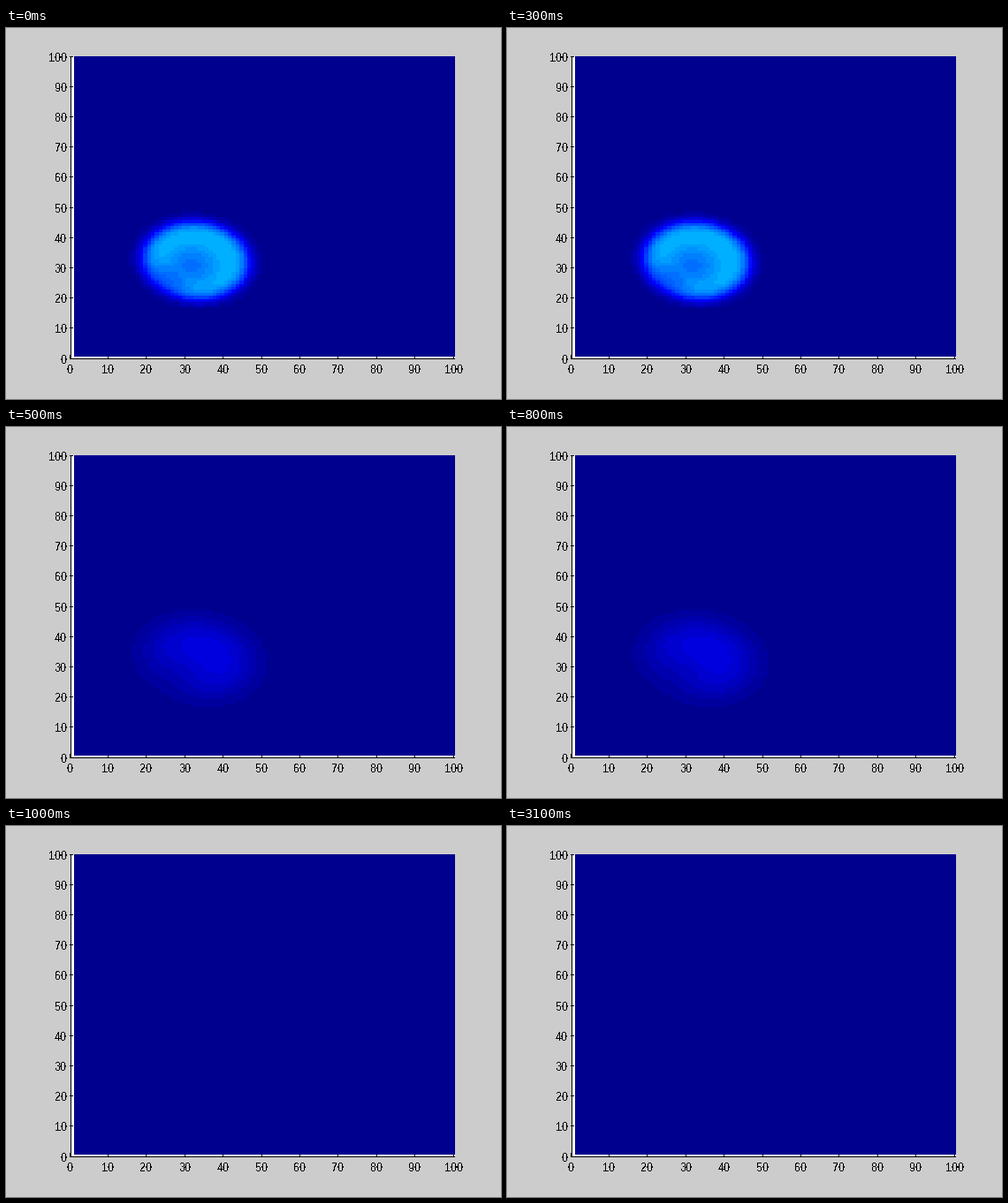
Write a matplotlib script that moves like this. It is 560 px wide and 420 px high and loops after 4500 ms.

```python
import numpy as np
import matplotlib.pyplot as plt
from matplotlib.animation import FuncAnimation
from matplotlib.patches import Rectangle

WIDTH, HEIGHT, DPI = 560, 420, 100
LEFT, RIGHT, TOP, BOTTOM = 72, 506, 32, 374
CELLS = 99

plt.rcParams.update({
    "font.family": "Liberation Sans",
    "text.hinting": "native",
    "text.hinting_factor": 1,
    "text.antialiased": False,
})

fig = plt.figure(figsize=(WIDTH / DPI, HEIGHT / DPI), dpi=DPI, facecolor="#cccccc")
ax = fig.add_axes([0, 0, 1, 1])
ax.axis("off")

grid = np.arange(CELLS) + 1.5
X, Y = np.meshgrid(grid, grid)


def ellipse(cx, cy, rx, ry, tilt):
    """Radius measured in units of a tilted ellipse."""
    u, v = (X - cx) / rx, (Y - cy) / ry
    return np.sqrt((u * u + v * v - 2 * tilt * u * v) / (1 - tilt * tilt))


def plateau(radius, edge, softness):
    return 1 / (1 + np.exp((radius - edge) / softness))


def bump(cx, cy, size):
    return np.exp(-((X - cx) ** 2 + (Y - cy) ** 2) / (2 * size * size))


def ring():
    disc = plateau(ellipse(32.6, 32.6, 13.9, 12.9, -0.05), 0.98, 0.09)
    hollow = np.maximum(bump(31.5, 31, 5), bump(26, 26.5, 5))
    return 20 * disc * (1 - 0.28 * hollow)


def fading_ring():
    disc = plateau(ellipse(33.6, 33, 17.3, 15.8, -0.1), 0.72, 0.18)
    return 6.4 * disc * (1 - 0.42 * bump(27, 26.5, 6.5))


def jet(values):
    """Lower part of a 64-step jet colour map."""
    level = np.floor(values)
    red = np.zeros_like(level)
    green = np.clip((level - 7) / 16, 0, 1)
    blue = np.clip((level + 9) / 16, 0, 1)
    return np.dstack([red, green, blue])[::-1]


def box(x0, y0, x1, y1, color):
    ax.add_patch(Rectangle((x0, y0), x1 - x0, y1 - y0, facecolor=color,
                           linewidth=0, antialiased=False))


def label(x, y, value, align):
    ax.text(x, y, str(value), ha=align, va="baseline",
            fontsize=13 * 72 / DPI, color="black")


stages = [jet(ring()), jet(fading_ring()), jet(np.zeros_like(X))]
image = ax.imshow(stages[0], extent=(77, 508, 372, 32), origin="upper",
                  interpolation="nearest", aspect="auto", zorder=2)

box(LEFT + 1, TOP, RIGHT + 2, BOTTOM + 1, "white")
box(LEFT + 1, TOP, LEFT + 2, BOTTOM + 1, "black")
box(LEFT + 1, BOTTOM, RIGHT + 2, BOTTOM + 1, "black")

for value in range(0, 101, 10):
    x = LEFT + (RIGHT - LEFT) * value // 100
    y = BOTTOM - -(-(BOTTOM - TOP) * value // 100)
    box(LEFT, y, LEFT + 4, y + 1, "black")
    box(x, BOTTOM - 4, x + 1, BOTTOM + 1, "black")
    label(x + 0.5, 391, value, "center")
    label(69, y + 6, value, "right")

ax.set_xlim(0, WIDTH)
ax.set_ylim(HEIGHT, 0)


def update(frame):
    image.set_data(stages[min(frame, 2)])
    return [image]


anim = FuncAnimation(fig, update, frames=9, interval=500, repeat=True,
                     repeat_delay=0, blit=False)
plt.show()
```
